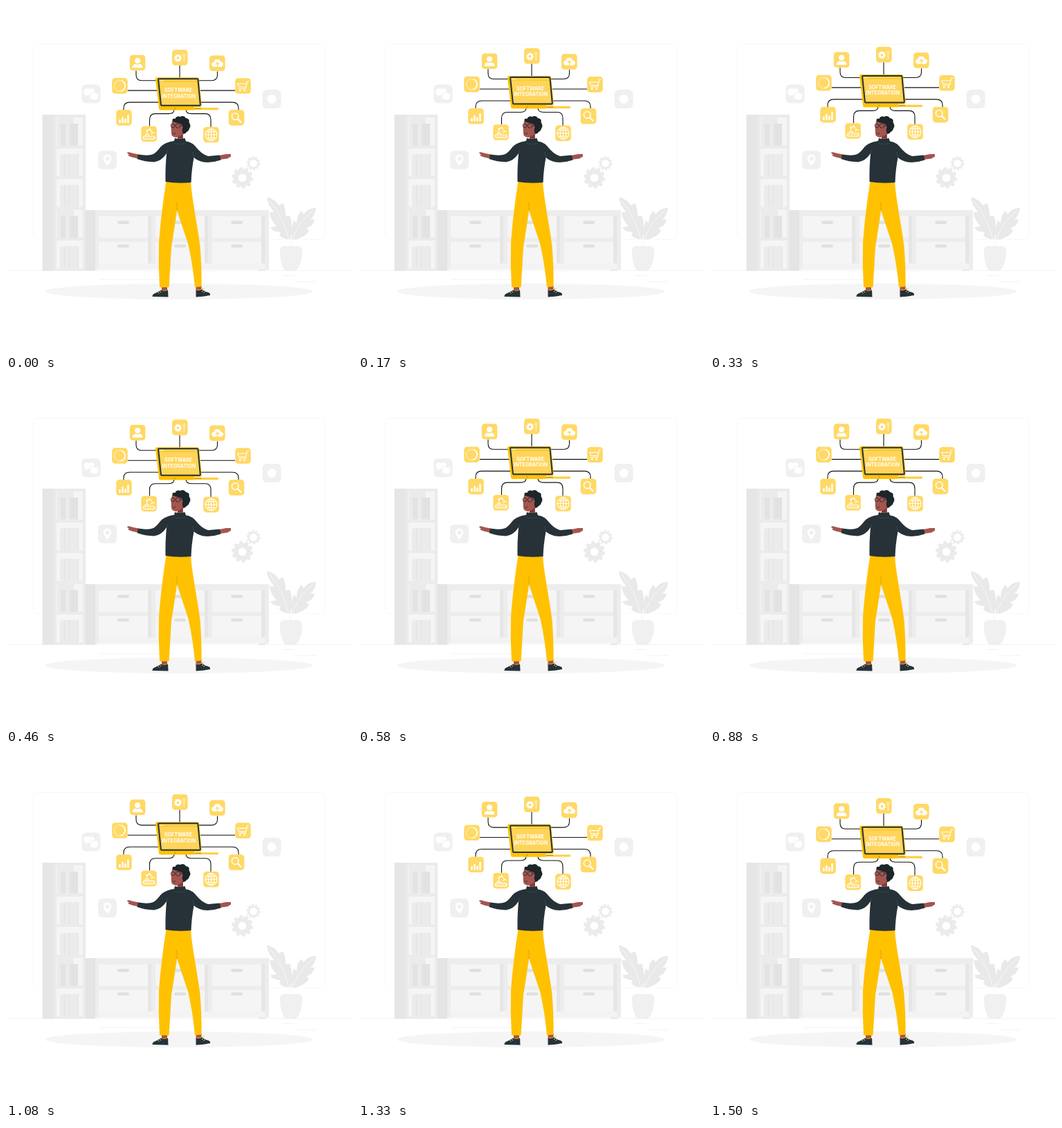
Recreate the animation shown at these times as an HTML page. Size 500 by 500 pixels, loop 1.54 s.

```html
<!DOCTYPE html>
<html lang="en">
<head>
<meta charset="utf-8">
<title>Software integration</title>
<style>
  html, body { margin: 0; width: 100%; height: 100%; overflow: hidden; background: #fff; }
  svg { display: block; width: 100%; height: 100%; }
  .line { fill: none; stroke: #111; stroke-width: 1.1; }
  .white { fill: #fff; }
  .stroke { fill: none; stroke: #fff; stroke-width: 1.1; stroke-linecap: round; stroke-linejoin: round; }
  .label { font: 700 7.1px Inter, sans-serif; fill: #fff; text-anchor: middle; }
</style>
</head>
<body>
<svg viewBox="0 0 500 500">
  <defs>
    <rect id="tile" width="22.600" height="22.600" rx="4.500" fill="#ffd966"/>
    <rect id="badge" width="27" height="27" rx="6" fill="#f0f0f0"/>
    <g id="tall">
      <path fill="#ebebeb" d="M74 161h24v40.500H74z"/>
      <path fill="#e3e3e3" d="M79 170h7v31.500h-7zM92 170h12v31.500H92z"/>
      <path fill="#dedede" d="M97 170h1v31.500h-1zM103 170h1v31.500h-1z"/>
    </g>
    <g id="wide">
      <path fill="#ebebeb" d="M78 216l4-2h22v32H78z"/>
      <path fill="#e3e3e3" d="M91 214h1v32h-1zM84 214h1v32h-1zM104 214h1v32h-1z"/>
    </g>
    <g id="drawers">
      <path fill="#f5f5f5" d="M134 304h71v31h-71zM134 341h71v31h-71z"/>
      <path fill="#e6e6e6" d="M205 304h5v68h-5z"/>
      <rect x="161" y="310.500" width="17" height="4.500" rx="2.200" fill="#e0e0e0"/>
      <rect x="161" y="344.500" width="17" height="4.500" rx="2.200" fill="#e0e0e0"/>
    </g>
  </defs>

  <!-- room -->
  <rect x="39.500" y="55.500" width="421" height="282" rx="5" fill="none" stroke="#f8f8f8"/>
  <path fill="none" stroke="#efefef" stroke-width=".7" d="M0 382.500H500M135 395.500H240M400 389.500H416M418 398.500H448"/>
  <ellipse cx="250" cy="412.500" rx="193.500" ry="11.500" fill="#f5f5f5"/>

  <!-- bookshelf -->
  <path fill="#e6e6e6" d="M52.500 157H69v225.500H52.500z"/>
  <path fill="#ebebeb" d="M69 157h46v225.500H69z"/>
  <path fill="#f5f5f5" d="M73 161h38v40.500H73zM73 206h38v40H73zM73 250h38v40.500H73zM73 294.500h38v40H73zM73 339h38v40H73z"/>
  <use href="#tall"/>
  <use href="#wide"/>
  <use href="#wide" y="44.500"/>
  <use href="#tall" y="133.500"/>
  <use href="#wide" y="133"/>

  <!-- cabinet -->
  <path fill="#e4e4e4" d="M115 295h14v87.500h-14zM365 379h10v3.500h-10z"/>
  <path fill="#ededed" d="M129 295h251v86H129z"/>
  <path fill="#f3f3f3" d="M134 372h240v9H134z"/>
  <use href="#drawers"/>
  <use href="#drawers" x="82"/>
  <use href="#drawers" x="164"/>

  <!-- plant -->
  <g fill="#e9e9e9">
    <path d="M411 337Q399 337 395 331L397 327Q385 326 382 320L391 318Q382 310 381 298L388 298Q378 288 377 276Q389 279 394 288L400 285Q405 294 404 304L410 303Q416 318 411 337Z"/>
    <path d="M413 338Q411 322 416 310L420 314Q420 302 427 296L430 301Q437 291 448 292Q447 303 440 308L446 309Q443 319 434 321L438 325Q430 337 413 338Z"/>
  </g>
  <path fill="#f0f0f0" d="M396 352Q397 347 403 347H421Q427 347 428 352Q429 366 422 379Q420 383 416 383H407Q403 383 401 379Q395 366 396 352Z"/>
  <path fill="none" stroke="#f8f8f8" d="M380 280Q402 305 411 347M411 347Q418 316 444 295"/>

  <!-- grey badges and gears -->
  <g transform="translate(109.500 113.500)">
    <use href="#badge"/>
    <path class="white" d="M6 6h9q3 0 3 3v3q0 3-3 3H9l-4 3 1-3q-3-1-3-3V9q0-3 3-3Z"/>
    <path class="white" stroke="#f0f0f0" d="M15 12h6q3 0 3 3v3q0 2-2 3l1 3-4-2h-4q-3 0-3-3v-3q0-4 3-4Z"/>
  </g>
  <g transform="translate(133 209)">
    <use href="#badge"/>
    <path class="white" fill-rule="evenodd" d="M13.500 22Q7.500 14 7.500 11.500a6 6 0 0 1 12 0Q19.500 14 13.500 22ZM10.500 11.500a3 3 0 0 0 6 0a3 3 0 0 0-6 0Z"/>
  </g>
  <g transform="translate(370.500 121)">
    <use href="#badge"/>
    <circle class="white" cx="13.500" cy="13.500" r="6.500"/>
  </g>
  <g fill="none" stroke="#ebebeb">
    <circle cx="341.500" cy="248.300" r="9.300" stroke-width="7"/>
    <circle cx="341.500" cy="248.300" r="13.800" stroke-width="3.400" pathLength="20" stroke-dasharray="1.100 .9"/>
    <circle cx="357.500" cy="227.300" r="6.800" stroke-width="2.600"/>
    <circle cx="357.500" cy="227.300" r="9.100" stroke-width="2.200" pathLength="20" stroke-dasharray="1.100 .9"/>
  </g>

  <!-- person -->
  <g fill="#a4554f">
    <path d="M192 214.500L184 213Q176 210 175 212Q176 214 178 214.500L176 216L182 218.500L191 220.500ZM308 216L318 214L325 214L325 217.500L320 220.500L309 222ZM225 404h8v8h-8zM274.500 404h8v8h-8z"/>
    <path d="M240 166Q237.500 180 239.500 187Q243 191 248 189.500V194H256V184Q262 179 260 168Q250 162 240 166Z"/>
  </g>
  <path fill="#7c3a38" d="M248 189.500Q253 188 255 184V191H248Z"/>
  <path fill="#1c262b" d="M241 167Q239 162 244.500 163Q246 158 252 160Q257 157.500 260 162Q266 163 264.500 168Q268 173 265 177Q264 181 261 182Q259 185.500 256 185L254.500 179Q257 173 253 170.500Q247 168.500 241 167Z"/>
  <g fill="none" stroke="#1c262b" stroke-width=".8">
    <circle cx="241" cy="173" r="2.800"/>
    <circle cx="248.500" cy="173" r="3.300"/>
    <path d="M251.800 172.500L257 173.500M241 184q2 .8 4-.3"/>
  </g>
  <path fill="#ffc100" d="M231.500 253H267C268 275 277 318 280.500 347Q283 380 282.500 405.500L273 406.500Q270 374 263.500 345L247 295Q243 325 239 348L235.500 406.500H222Q220 374 221 342Q224 300 231.500 253Z"/>
  <path fill="none" stroke="#c89600" stroke-width=".6" d="M247 296Q248 290 246 283"/>
  <path fill="#263238" d="M191 214.500Q206 217 213 214Q218 211 223 204Q229 197 243 195L244 191Q251 193 258.500 191L260 195.500Q268 196.500 273 202Q282 214 292 217L309 215.500L310.500 222.500Q298 227 285 225.500Q276 223 271.500 219Q268 238 267.500 255Q248 257 230.500 254Q230 235 232 213Q225 224 214 225.500Q200 225 189.500 221Z"/>
  <path fill="none" stroke="#455a64" stroke-width=".5" d="M243.500 198.500Q251 201 259.500 198.500M232 214L234 208M271.500 219L270 211"/>
  <path fill="#263238" d="M211.500 420Q211 416 218 414L225 410Q229 412 234 410L234.500 420.500ZM274.500 420.500V410Q278 412 283 409.500L289 413Q296 414 295 418Q285 420 274.500 420.500Z"/>
  <path fill="none" stroke="#fff" stroke-width=".8" d="M219.500 413.500l2 2M222 412l2 2M285 411l-2 2M287.500 412.500l-2 2"/>
  <path fill="none" stroke="#ffc100" stroke-width=".8" d="M224 410.500q4 2 10 0M275 410.500q5 1 9-2l3-.500"/>

  <!-- floating network -->
  <g id="network">
    <path class="line" d="M188 94V100Q188 108.300 196 108.300H218M251 86V104M305.500 95V100Q305.500 108.300 297 108.300H279M176 122.700H219M281 122.700H331M170 151V148Q170 139.700 179 139.700H222M336 151V148Q336 139.700 327 139.700H281M207.500 174V165Q207.500 156.200 216 156.200H235Q243 156.200 243 150M296 176V165Q296 156.200 288 156.200H268Q260 156.200 260 150"/>

    <path fill="#ffc100" d="M218 103.700H276.500Q278.500 103.700 279 105.500L282.700 144Q282.700 146.200 281 146.500H272V151H224Q221 151 221 148.500L216 106Q216 103.700 218 103.700Z"/>
    <path fill="#ffcf40" d="M271 147.600H306.500Q308 149 306.500 150.800H271Z"/>
    <path fill="#ffd45a" stroke="#263238" stroke-width="2" stroke-linejoin="round" d="M221 105.800H276.300Q277.300 105.800 277.400 106.800L280.800 143Q280.800 144.200 279.600 144.200H225Q224 144.200 223.900 143.200L220.100 106.800Q220.100 105.800 221 105.800Z"/>
    <path fill="none" stroke="#ffc100" d="M222 109.800H276"/>
    <path fill="none" stroke="#fff" stroke-width=".8" d="M222.500 108.600h5"/>
    <path fill="none" stroke="#a67d00" stroke-width=".9" d="M272 148.600h10M244 147.500l1 2"/>
    <text class="label" x="249" y="124.700">SOFTWARE</text>
    <text class="label" x="249.800" y="133.200">INTEGRATION</text>

    <g transform="translate(178.800 71.200)">
      <use href="#tile"/>
      <circle class="white" cx="11.300" cy="8.300" r="4"/>
      <path class="white" d="M3.800 18.500Q3.800 13.500 8.800 13L11.300 14L13.800 13Q18.800 13.500 18.800 18.500Z"/>
    </g>
    <g transform="translate(240 63.700)">
      <use href="#tile"/>
      <circle cx="8.500" cy="12" r="3.300" fill="none" stroke="#fff" stroke-width="2.800"/>
      <circle cx="8.500" cy="12" r="5" fill="none" stroke="#fff" stroke-width="1.200" pathLength="16" stroke-dasharray="1"/>
      <path class="stroke" style="stroke-width:.9" d="M17.300 9.500V17.500M15.800 6V8.300L17.300 9.500L18.800 8.300V6"/>
    </g>
    <g transform="translate(294 72)">
      <use href="#tile"/>
      <path class="white" d="M6.500 16.500Q3 16 3 12.800Q3.300 10 6.300 9.800Q7 5.500 11.500 5.500Q15.500 5.700 16.400 9.400Q20 9.800 20 13Q19.700 16.300 16.500 16.500Z"/>
      <path fill="none" stroke="#ffd966" stroke-width="1.300" d="M11.500 17V10.500M9 12.800L11.500 10.200L14 12.800"/>
    </g>
    <g transform="translate(153.200 104.600)">
      <use href="#tile"/>
      <circle cx="11.300" cy="11.300" r="7.800" fill="none" stroke="#fff" stroke-width="1" stroke-dasharray="2 .8"/>
      <path class="stroke" style="stroke-width:1.600" d="M14 4.300A7.500 7.500 0 0 1 13 18.600"/>
    </g>
    <g transform="translate(331.200 104.800)">
      <use href="#tile"/>
      <path class="stroke" d="M19.500 4.500H17.500L15 15H5.500M16.700 8H3.500L5.500 12.800H15.500"/>
      <circle class="white" cx="7" cy="17.600" r="1.300"/>
      <circle class="white" cx="13.500" cy="17.600" r="1.300"/>
    </g>
    <g transform="translate(159.200 150.600)">
      <use href="#tile"/>
      <path class="white" d="M4 14h2.500v5H4zM8 10.500h2.500V19H8zM12 13h2.500v6H12zM16 7.500h2.500V19H16z"/>
    </g>
    <g transform="translate(321.700 150.600)">
      <use href="#tile"/>
      <circle class="stroke" style="stroke-width:1.500" cx="9.500" cy="9.500" r="4.800"/>
      <path class="stroke" style="stroke-width:2.200" d="M13.800 13.800L17.800 17.800"/>
    </g>
    <g transform="translate(195.300 174)">
      <use href="#tile"/>
      <rect class="stroke" x="2.800" y="14.800" width="17" height="4.300" rx="2.100"/>
      <path class="stroke" stroke-dasharray=".1 4" style="stroke-width:1.700" d="M5.500 17H18"/>
      <path class="stroke" d="M6 14V12.500H11V14M8 12L8.500 6.500L12.500 4.500L16.500 9.500M14.500 11.500L16.500 9.500L19 10.500"/>
      <circle class="white" cx="8.500" cy="6.500" r="1.400"/>
      <circle class="white" cx="12.500" cy="4.800" r="1.300"/>
    </g>
    <g transform="translate(285.200 175.300)">
      <use href="#tile"/>
      <circle class="stroke" cx="11.300" cy="11.300" r="8.500"/>
      <ellipse class="stroke" cx="11.300" cy="11.300" rx="4.200" ry="8.500"/>
      <path class="stroke" d="M11.300 3V19.800M3 11.300H19.800M4.500 7H18.200M4.500 15.700H18.200"/>
    </g>
  </g>
</svg>
<script>
  const LOOP = 1540, LEAD = 40, RISE = 10;
  const network = document.getElementById("network");
  const start = performance.now();

  function draw(now) {
    const phase = (Math.max(0, now - start) + LEAD) % LOOP / LOOP;
    const lift = RISE * (1 - Math.abs(1 - 2 * phase));
    network.setAttribute("transform", `translate(0 ${-lift})`);
    requestAnimationFrame(draw);
  }
  draw(start);
</script>
</body>
</html>
```
